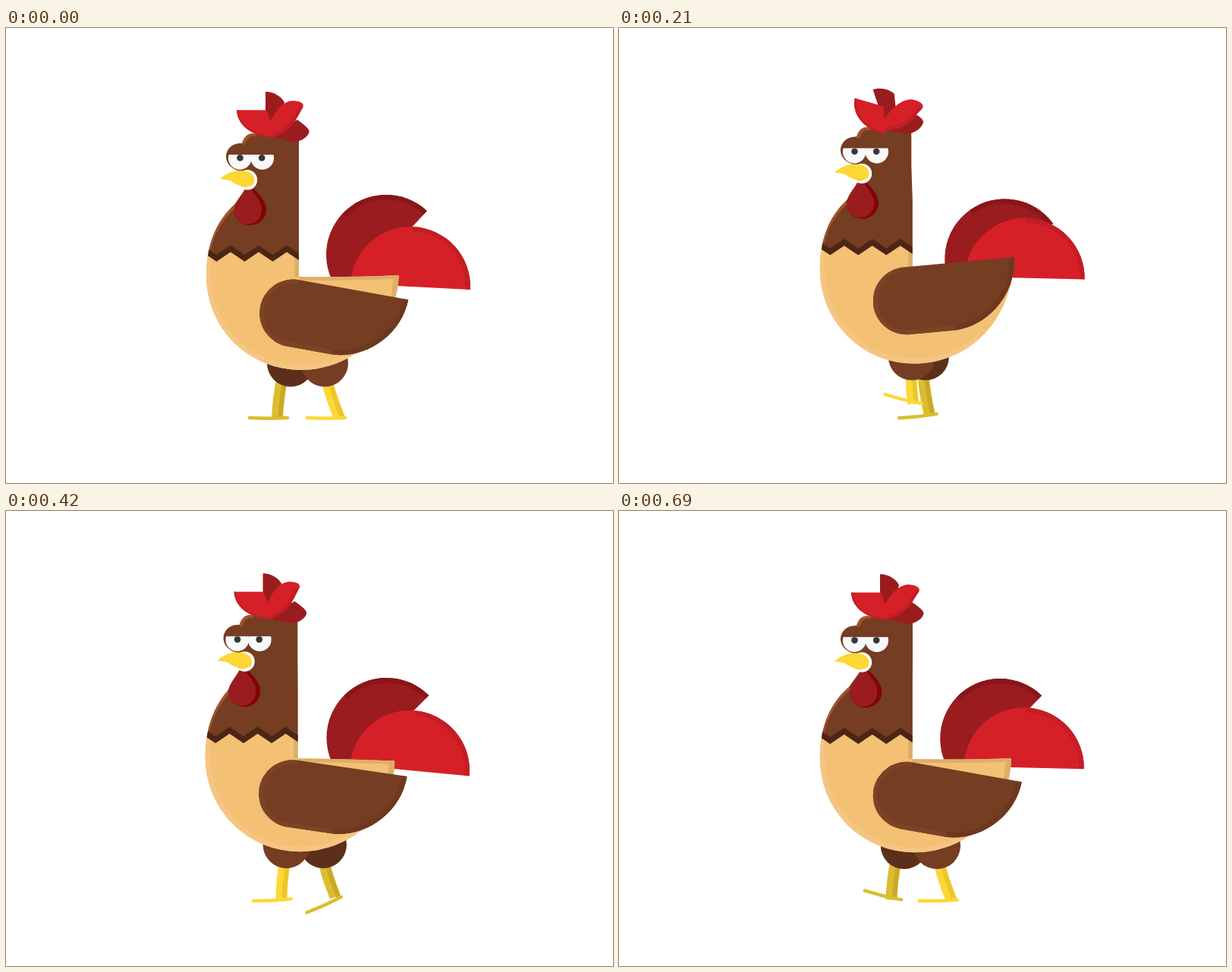
An HTML page with a canvas that plays this animation: 800x600 px, repeating every 0.72 s.

```html
<!DOCTYPE html>
<html lang="en">
<head>
<meta charset="utf-8">
<title>Walking rooster</title>
<style>
  html, body { margin: 0; width: 100%; height: 100%; overflow: hidden; background: #fff; }
  canvas { display: block; width: 800px; height: 600px; }
</style>
</head>
<body>
<canvas id="stage" width="800" height="600"></canvas>
<script>
const ctx = document.getElementById('stage').getContext('2d');
const { PI, sin, cos, min, max, floor } = Math;
const LOOP = 720, STEP = 30, RAD = PI / 180;
const BROWN = '#753d22', SHADE = '#5c2f1a', RUST = '#a0522e', COLLAR = '#4c2615';
const TAN = '#f3c074', TAN_LIGHT = '#f5c583', TAN_DARK = '#dcae69';
const RED = '#d62027', RED_DARK = '#c41d24', WINE = '#9a1c1f', WINE_DARK = '#891619';

function fill(d, color) {
  ctx.fillStyle = color;
  ctx.fill(d instanceof Path2D ? d : new Path2D(d));
}
function line(d, color, width, cap = 'butt') {
  ctx.strokeStyle = color;
  ctx.lineWidth = width;
  ctx.lineCap = cap;
  ctx.stroke(new Path2D(d));
}
function disc(x, y, r, color) {
  ctx.beginPath();
  ctx.arc(x, y, r, 0, PI * 2);
  ctx.fillStyle = color;
  ctx.fill();
}
function group(x, y, deg, draw) {
  ctx.save();
  ctx.translate(x, y);
  ctx.rotate(deg * RAD);
  draw();
  ctx.restore();
}
function clipped(path, draw) {
  ctx.save();
  ctx.clip(path);
  draw();
  ctx.restore();
}
// Turn a shape about a fixed point of its own drawing.
function pivot(x, y, deg, draw) {
  group(x, y, deg, () => { ctx.translate(-x, -y); draw(); });
}

function drawFeather(x, y, deg, color, edge) {
  group(x, y, deg, () => {
    const half = new Path2D('M-79 0A79 79 0 0 1 79 0Z');
    fill(half, color);
    clipped(half, () => line('M0 -79A79 79 0 0 1 79 0', edge, 13));
  });
}

// The foot stands on the ground for half a turn, then lifts and swings forward.
function drawLeg(turn, bob, color, edge) {
  const c = cos(turn), s = sin(turn);
  const tilt = RAD * (s > 0 ? -6 * s : -28 * sin(2 * turn));
  const heelX = 409 - 38 * c, heelY = 514 - (s > 0 ? 5 * s : 20 * s * s);
  const toeX = heelX - 50 * cos(tilt), toeY = heelY - 50 * sin(tilt);
  const hipX = 393 - 29 * c, hipY = 462 + bob, ankleX = heelX - 10.5 - 3 * c;
  const shin = dx => `M${hipX + dx} ${hipY}Q${(hipX + ankleX) / 2 - 2 + dx} ${(hipY + heelY) / 2} ${ankleX + dx} ${heelY}`;
  line(shin(0), color, 15);
  line(shin(4), edge, 6);
  line(`M${toeX} ${toeY}Q${(toeX + heelX) / 2} ${(toeY + heelY) / 2 + 1.5} ${heelX} ${heelY}`, color, 4.4, 'round');
}

function drawTorso(bob, headX, bodyX, napeX, rumpX, rumpY) {
  const X = v => v + bodyX, H = v => v + headX, Y = v => v + bob;
  const belly = `A124 124 0 0 0 ${X(388)} ${Y(451)}`;
  const back = `Q${X(455)} ${Y(329)} ${X(386)} ${Y(328)}`;
  const body = new Path2D(`M${napeX} ${Y(140)}H${H(330)}Q${H(316)} ${Y(136)} ${H(311)} ${Y(152)}
    C${H(298)} ${Y(151)} ${H(290)} ${Y(160)} ${H(290)} ${Y(170)}Q${H(291)} ${Y(183)} ${H(306)} ${Y(188)}
    L${H(316)} ${Y(212)}L${H(301)} ${Y(233)}C${X(280)} ${Y(252)} ${X(264)} ${Y(282)} ${X(264)} ${Y(327)}${belly}
    C${X(456)} ${Y(451)} ${X(514)} ${Y(400)} ${rumpX} ${rumpY}${back}V${Y(236)}L${napeX} ${Y(190)}Z`);
  let zigzag = '';
  for (let i = 0; i < 8; i++) zigzag += `L${X(259 + 18.5 * i)} ${Y(i % 2 ? 303.5 : 291)}`;

  fill(body, TAN);
  clipped(body, () => {
    line(`M${X(264)} ${Y(290)}V${Y(327)}${belly}Q${X(440)} ${Y(451)} ${X(475)} ${Y(418)}`, TAN_LIGHT, 13);
    line(`M${rumpX} ${rumpY}${back}`, TAN_DARK, 9);
    line(`M${rumpX} ${rumpY}l-3 30`, TAN_DARK, 14);
    line(`M${X(386)} ${Y(290)}V${Y(328)}`, TAN_DARK, 11);
    fill(`M${X(250)} ${Y(100)}${zigzag}L${X(400)} ${Y(100)}Z`, BROWN);
    line(`M${H(301)} ${Y(233)}C${X(284)} ${Y(248)} ${X(270)} ${Y(270)} ${X(266)} ${Y(292)}`, RUST, 8);
    line(`M${H(311)} ${Y(153)}Q${H(316)} ${Y(136)} ${H(330)} ${Y(139)}`, RUST, 8);
    line('M' + zigzag.slice(1), COLLAR, 7.5);
  });
}

function drawWattle() {
  fill('M316 212C312 222 301 230 301 240C301 252 311 260 322 260C334 260 343 251 343 239C343 228 334 220 327 212Z', '#800508');
  fill('M315 212C310 222 301 230 301 240C301 251 310 258.5 319 258.5C330 258.5 337 250 337 239C337 228 328 221 323 212Z', WINE);
}

function drawFace(lid) {
  const top = 167 + 1.7 * lid, low = 188 - 9.7 * lid;
  const open = new Path2D(`M285 ${top}H360V${low - 1}Q338 ${low + .5} 323 ${low}Q308 ${low + .5} 285 ${low - 1}Z`);
  clipped(open, () => {
    for (const x of [308.2, 337.8]) disc(x, 171.5, 15.3, '#f9f8fb');
    for (const x of [308.5, 337.2]) disc(x, 171.2, 4.3, '#3a3637');
  });
  disc(318, 200.3, 13.2, '#fff');
  fill('M304 204Q313 214 326 206L322 198Z', '#ef9a12');
  fill('M282 199C289 193 297 188 309 188C320 188 327.5 193 327.5 201C327.5 206 323 209.5 316 209C308 208.5 301 206 297 202C292 200 287 200 282 199Z', '#fdd733');
}

function drawLeaf(d, edge, width) {
  const leaf = new Path2D(d);
  fill(leaf, RED);
  clipped(leaf, () => line(edge, RED_DARK, width));
}

function drawComb(lift, c, s) {
  pivot(355, 116, -21 * lift, () => fill('M342 84C354 84 363 91 367 98L358 140L342 132Z', WINE));
  pivot(355, 140, -3 + 3 * c + 1.5 * s, () =>
    fill('M350 140L384 121C392 127 401 133 399.5 138C396 146 386 151 376 150L350 143Z', WINE));
  pivot(333, 122, 18.5 * lift, () =>
    drawLeaf('M304 108.3H343L356 143C330 146 305 131 304 108.3Z', 'M304 108C305 131 330 146 356 143', 5));
  pivot(351, 137, 5.5 - 5.5 * c - 5.5 * s, () =>
    drawLeaf('M343 143C345 124 360 96 378 96C388 96 395 100 390.5 106C384 116 378 137 352 143Z',
      'M391 105C384 116 378 137 352 143', 9));
}

function drawWing(x, y, deg) {
  group(x, y, deg, () => {
    const shape = new Path2D('M0 -44.5H146C145 5 103 43 60 44.5H0A44.5 44.5 0 0 1 0 -44.5Z');
    fill(shape, BROWN);
    clipped(shape, () => {
      line('M146 -44.5C145 5 103 43 60 44.5', '#6d381f', 13);
      line('M60 44.5H0A44.5 44.5 0 0 1 0 -44.5', '#7c4327', 12);
    });
  });
}

function draw(t) {
  // One turn is two steps: C and S follow the stride, c and s each step.
  const turn = t / LOOP * 2 * PI;
  const C = cos(turn), S = sin(turn), c = cos(2 * turn), s = sin(2 * turn);
  const bob = -4.4 + 4.4 * c + .4 * s, lift = max(0, -c);
  const headX = -4 * s, bodyX = -1.6 * s, napeX = 386 - 2 * s - 2 * lift;
  const lid = max(0, min(1, (t - 450) / 60, (600 - t) / 60));

  ctx.fillStyle = '#fff';
  ctx.fillRect(0, 0, 800, 600);

  drawFeather(504.5 - 3.5 * c - 1.5 * s, 301.5 - 2.5 * c - 1.5 * s, -41.3 - 5.7 * c - .8 * s, WINE, WINE_DARK);
  drawFeather(533.5 - .5 * c - 1.5 * s, 336 + 5 * c + 4 * s, 2.9 + 3 * s, RED, RED_DARK);
  drawLeg(turn, bob, '#dcbd2f', '#cba928');
  disc(398 - 23 * C, 442 + bob, 31, SHADE);
  drawLeg(turn + PI, bob, '#fdd835', '#edc52c');
  disc(393 + 27 * C, 442 + bob, 31, BROWN);
  drawTorso(bob, headX, bodyX, napeX,
    515.5 + 2.3 * c - 2 * s + 5.5 * S, 319.5 + 13.3 * c - 3 * s - 6.8 * C);
  group(-2.5 + 2.5 * c - 7.5 * s, bob, 0, drawWattle);
  group(headX, bob, 0, () => {
    drawFace(lid);
    drawComb(lift, c, s);
  });
  drawWing(378.7 - 1.2 * s, 368.1 + 7.9 * c - 1.5 * S, 3.5 + 6.8 * c - 3 * S);
}

const start = performance.now();
function tick() {
  const ms = (performance.now() - start) % LOOP;
  draw(floor(ms / STEP) * STEP);
  requestAnimationFrame(tick);
}
tick();
</script>
</body>
</html>
```
